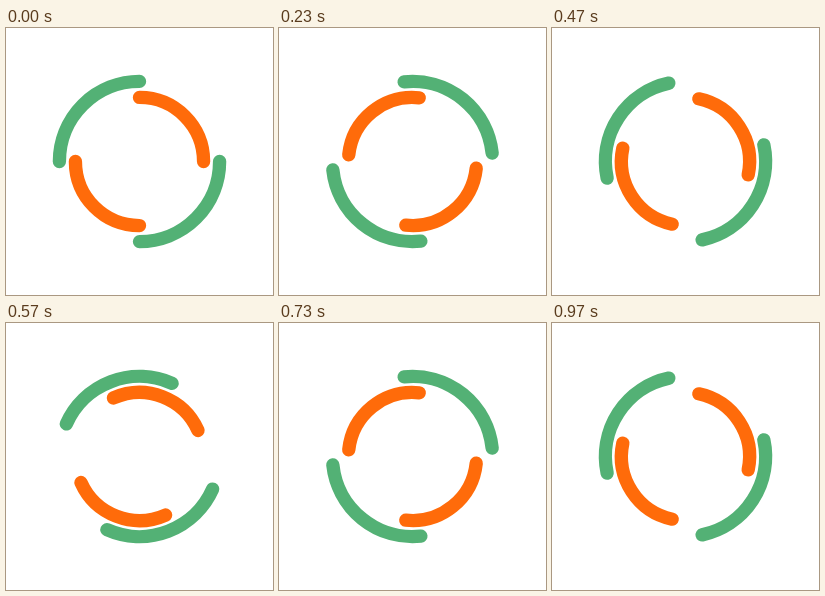
Recreate the animation shown at these times as an HTML page. Size 267 by 267 pixels, loop 1 s.

```html
<!DOCTYPE html>
<html lang="en">
<head>
<meta charset="utf-8">
<title>Double ring loader</title>
<style>
  html, body { margin: 0; width: 100%; height: 100%; overflow: hidden; background: #fff; }
  svg { display: block; width: 100%; height: 100%; }
  path { fill: none; stroke-width: 5; stroke-linecap: round; }
</style>
</head>
<body>
<svg viewBox="0 0 100 100">
  <g transform="translate(50 50)">
    <path id="outer" stroke="#53b175" d="M-30 0A30 30 0 0 1 0 -30M30 0A30 30 0 0 1 0 30"/>
    <path id="inner" stroke="#ff6b0a" d="M0 -24A24 24 0 0 1 24 0M0 24A24 24 0 0 1 -24 0"/>
  </g>
</svg>
<script>
  const LOOP = 1000, FPS = 30;
  const outer = document.getElementById('outer');
  const inner = document.getElementById('inner');

  // Thirty steps per loop, each starting on the nearest 10 ms.
  function stepAt(ms) {
    const tick = Math.floor((ms % LOOP) / 10) * 10;
    return Math.floor((tick + 5) * FPS / 1000);
  }

  function draw(ms) {
    const angle = stepAt(ms) * 360 / FPS;
    outer.setAttribute('transform', `rotate(${angle})`);
    inner.setAttribute('transform', `rotate(${-angle})`);
  }

  let start;
  function frame(now) {
    start ??= now;
    draw(now - start);
    requestAnimationFrame(frame);
  }

  draw(0);
  requestAnimationFrame(frame);
</script>
</body>
</html>
```
